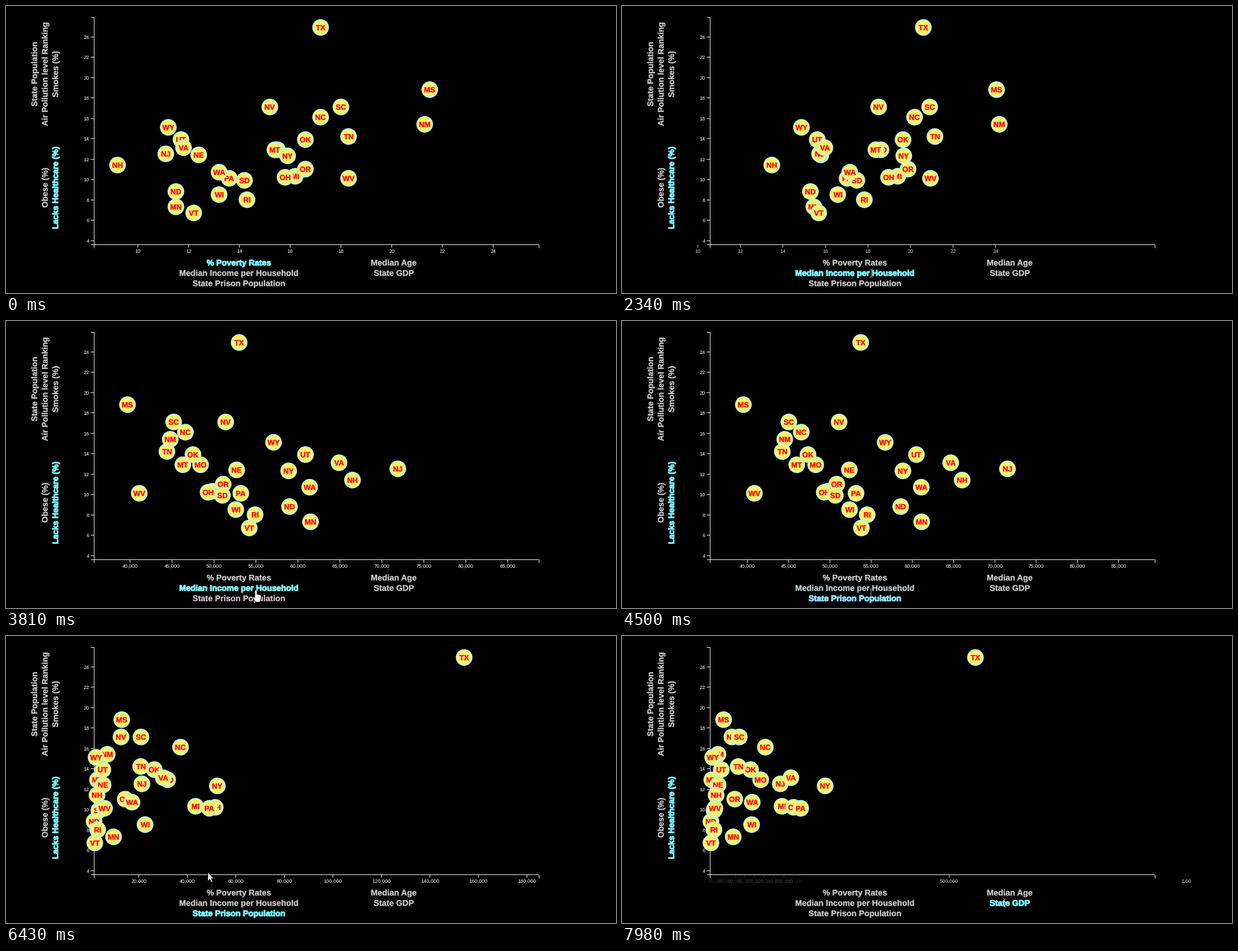
Write a matplotlib script that moves like this. It is 1090 px wide and 514 px high and loops after 8 s.

```python
import numpy as np
import matplotlib.pyplot as plt
from matplotlib.animation import FuncAnimation
from matplotlib.collections import LineCollection, PathCollection
from matplotlib.colors import to_rgb
from matplotlib.patches import Circle, PathPatch, Polygon, Rectangle
from matplotlib.path import Path
from matplotlib.textpath import TextPath
from matplotlib.transforms import Affine2D, IdentityTransform

W, H, DPI = 1090, 514, 100
PX = 72 / DPI
LOOP, STEP = 8000, 20
REFRESH, PHASE = 77.3, 15      # the picture changes on this beat (ms)
MOVE, FADE = 1000, 300         # length of axis moves and colour fades (ms)
STARTS = [1990, 4315, 7307]    # when each axis move begins
LEFT, RIGHT, TOP, BOTTOM = 157.5, 952.5, 20.5, 427.5
BOLD = dict(family="Liberation Sans", weight="bold")
GREY, CYAN, PINK = (np.array(to_rgb(c)) for c in ("#c8c8c8", "#7df0ff", "#ff6fe0"))

# state: poverty %, lacks healthcare %, income and prisoners in thousands
DATA = dict(
    MI=(16.2, 10.3, 49.8, 43.4), MN=(11.5, 7.3, 61.5, 9.6), MS=(21.5, 18.8, 39.7, 13.0),
    MO=(15.5, 12.9, 48.4, 31.9), MT=(15.4, 12.9, 46.3, 3.0), NE=(12.4, 12.4, 52.7, 5.3),
    NV=(15.2, 17.1, 51.4, 12.7), NH=(9.2, 11.4, 66.5, 2.8), NJ=(11.1, 12.5, 71.9, 21.3),
    NM=(21.3, 15.4, 44.8, 7.0), NY=(15.9, 12.3, 58.9, 52.4), NC=(17.2, 16.1, 46.6, 37.2),
    ND=(11.5, 8.8, 59.0, 1.6), OH=(15.8, 10.2, 49.3, 51.5), OK=(16.6, 13.9, 47.5, 26.4),
    OR=(16.6, 11.0, 51.1, 14.4), PA=(13.6, 10.1, 53.2, 49.1), RI=(14.3, 8.0, 54.9, 3.1),
    SC=(18.0, 17.1, 45.2, 20.9), SD=(14.2, 9.9, 51.0, 3.6), TN=(18.3, 14.2, 44.4, 20.8),
    TX=(17.2, 24.9, 53.0, 154.1), UT=(11.7, 13.9, 60.9, 5.2), VT=(12.2, 6.7, 54.2, 1.9),
    VA=(11.8, 13.1, 64.9, 30.1), WA=(13.2, 10.7, 61.4, 17.2), WV=(18.3, 10.1, 41.1, 5.9),
    WI=(13.2, 8.5, 52.6, 22.6), WY=(11.2, 15.1, 57.1, 2.4))
poverty, health, income, prison = np.array(list(DATA.values())).T
# output grows with the size of a state and the square of its income
gdp = 15 * prison ** 0.9 * (income / 50) ** 2

# values, pixel of zero, pixels per unit, ticks
SCALES = [(poverty, -218.0, 45.36, range(10, 25, 2)),
          (1e3 * income, -378.4, 0.015, range(40000, 85001, 5000)),
          (1e3 * prison, 150.5, 0.004336, range(20000, 180001, 20000)),
          (1e3 * gdp, 150.0, 0.0002868, range(500000, 2500001, 500000))]


def lerp(a, b, k):
    return a + (b - a) * k


def ease(k):
    k = min(max(k, 0), 1)
    return 4 * k ** 3 if k < 0.5 else 1 - 4 * (1 - k) ** 3


def scale_y(v):
    return 420.1 - 18.25 * (v - 4)


fig = plt.figure(figsize=(W / DPI, H / DPI), dpi=DPI, facecolor="black")
ax = fig.add_axes([0, 0, 1, 1])
ax.set_xlim(0, W)
ax.set_ylim(H, 0)
ax.axis("off")
view = Rectangle((43, 0), 974, H, visible=False)
ax.add_patch(view)


# ---- axes ----
def line(xs, ys):
    ax.plot(xs, ys, color="white", lw=PX, snap=False)


def tick_text(x, y, s, ha):
    return ax.text(x, y, s, ha=ha, va="baseline", color="white", clip_on=True,
                   family="Liberation Sans", fontsize=9.2 * PX)


line([LEFT - 5.5, LEFT, LEFT, LEFT - 5.5], [TOP, TOP, BOTTOM, BOTTOM])
line([LEFT, LEFT, RIGHT, RIGHT], [BOTTOM + 5.5, BOTTOM, BOTTOM, BOTTOM + 5.5])
for v in range(4, 25, 2):
    y = np.floor(scale_y(v)) + 0.5
    line([LEFT - 5.5, LEFT], [y, y])
    tick_text(LEFT - 9, y + 3.3, str(v), "right")

tick_labels = {}
for v in sorted({v for s in SCALES for v in s[3]}):
    tick_labels[v] = tick_text(0, 442, f"{v:,}", "center")
    tick_labels[v].set_clip_path(view)
tick_lines = LineCollection([], linewidths=PX, snap=False)
ax.add_collection(tick_lines, autolim=False)
tick_lines.set_clip_path(view)


# ---- state dots: disc and text in turn, so later states cover earlier ones ----
def centred(s, size, drop):
    path = TextPath((0, 0), s, size=size, prop=BOLD)
    box = path.get_extents()
    return Affine2D().translate(-(box.x0 + box.x1) / 2, -drop).transform_path(path)


count = len(DATA)
disc = Affine2D().scale(14).transform_path(Path.unit_circle())
dots = PathCollection([p for s in DATA for p in (disc, centred(s, 13.4, 4.9))],
                      offsets=np.zeros((2 * count, 2)),
                      offset_transform=ax.transData, transform=IdentityTransform(),
                      facecolors=["#fff06a", "#ff0a0a"] * count,
                      edgecolors=["#a6f7f2", "#ff0a0a"] * count,
                      linewidths=[1.8 * PX, 0.5 * PX] * count, zorder=3)
ax.add_collection(dots, autolim=False)


# ---- captions ----
def paint(patch, color, strong):
    patch.set_facecolor(color)
    patch.set_edgecolor(color)
    patch.set_linewidth((1.2 if strong else 0.4) * PX)


def caption(s, cx, cy, color=GREY, turn=0):
    tr = Affine2D().scale(1, -1).rotate_deg(turn).translate(cx, cy)
    patch = PathPatch(tr.transform_path(centred(s, 14.7, 5.2)), zorder=4)
    ax.add_patch(patch)
    paint(patch, color, color is CYAN)
    return patch


for i, s in enumerate(["State Population", "Air Pollution level Ranking", "Smokes (%)"]):
    caption(s, 50.5 + 18.7 * i, 122.3, turn=-90)
caption("Obese (%)", 69.2, 325.5, turn=-90)
caption("Lacks Healthcare (%)", 87.9, 325.5, CYAN, -90)
caption("Median Age", 693, 459.5)

# Captions that react to the pointer, with their colour changes over time
REACTIVE = [
    (caption("% Poverty Rates", 416, 459.5),
     [(0, CYAN), (2000, GREY), (5720, PINK), (5790, GREY)]),
    (caption("Median Income per Household", 416, 478),
     [(0, GREY), (500, PINK), (2000, CYAN), (4250, GREY), (5580, PINK), (5710, GREY)]),
    (caption("State Prison Population", 416, 496.5),
     [(0, GREY), (330, PINK), (490, GREY), (3760, PINK), (4250, CYAN), (7320, GREY)]),
    (caption("State GDP", 693, 478),
     [(0, GREY), (6830, PINK), (7320, CYAN)]),
]


def caption_color(events, t):
    color = now = events[0][1]
    for start, new in events[1:]:
        if t >= start:
            color, now = lerp(color, new, min((t - start) / FADE, 1)), new
    return color, now is CYAN


# ---- pointer: time, x, y ----
PATH = np.array([(130, 471.5, 512.5), (600, 445, 478), (3740, 446, 479), (3960, 445, 487),
                 (5520, 445, 487), (6050, 242, 381), (6230, 242, 381), (6430, 360, 423),
                 (6850, 683.5, 478)])
KINDS = [(130, "arrow"), (330, "hand"), (2000, "beam"), (3760, "hand"), (4250, "beam"),
         (5580, "hand"), (5790, "arrow"), (6830, "hand"), (7320, "beam")]
CLICKS = [1860, 4110, 7180]
HOLD = 140

SHAPES = {
    "arrow": [(0, 0), (0, 16), (3.7, 12.6), (6.2, 18.4), (8.6, 17.4), (6.2, 11.6), (11, 11.4)],
    "hand": [(-1, 2), (0.5, 0.5), (2.5, 1.5), (3, 8), (9, 9.5), (10.3, 11.5),
             (10, 17), (8, 22), (0, 22), (-4.5, 15), (-4, 12.5), (-1, 14)],
    "beam": [(x * sx, y * sy) for sx, sy in ((1, -1), (1, 1), (-1, 1), (-1, -1))
             for x, y in ((0.5, 6.2), (3, 7.2), (3, 8), (0.5, 7.2))[::sx * sy]],
}
ring = Circle((0, 0), 11, facecolor="#f0d800", alpha=0.58, lw=0, zorder=6)
pointer = Polygon([(0, 0), (1, 1), (1, 0)], edgecolor="black", zorder=7)
ax.add_patch(ring)
ax.add_patch(pointer)


def draw_pointer(t):
    spot = np.array([np.interp(t, PATH[:, 0], PATH[:, i]) for i in (1, 2)])
    kind = next((k for start, k in reversed(KINDS) if t >= start), None)
    pointer.set_visible(kind is not None)
    if kind:
        beam = kind == "beam"
        pointer.set_xy(spot + np.array(SHAPES[kind]))
        pointer.set_facecolor("#b4b4b4" if beam else "white")
        pointer.set_linewidth(0 if beam else 0.9 * PX)
    ring.center = tuple(spot)
    ring.set_visible(any(0 <= t - c < HOLD for c in CLICKS))


def draw_scale(t):
    n = max(sum(t >= s for s in STARTS) - 1, 0)
    p = ease((t - STARTS[n]) / MOVE)
    (va, a0, ak, ta), (vb, b0, bk, tb) = SCALES[n:n + 2]
    xs = lerp(a0 + ak * va, b0 + bk * vb, p)
    dots.set_offsets(np.repeat(np.column_stack([xs, scale_y(health) - 0.2]), 2, axis=0))

    segs, colors = [], []
    for v, label in tick_labels.items():
        x = lerp(a0 + ak * v, b0 + bk * v, p)
        alpha = lerp(float(v in ta), float(v in tb), p)
        shown = alpha > 0.01 and 10 < x < W
        label.set_visible(shown)
        if shown:
            label.set_x(x)
            label.set_alpha(alpha)
            segs.append([(x, BOTTOM), (x, BOTTOM + 5.5)])
            colors.append((1, 1, 1, alpha))
    tick_lines.set_segments(segs)
    tick_lines.set_color(colors)


def draw(i):
    now = (i + 1) * STEP
    t = PHASE + REFRESH * ((now - PHASE) // REFRESH)
    draw_scale(t)
    for patch, events in REACTIVE:
        paint(patch, *caption_color(events, t))
    draw_pointer(t)
    return []


anim = FuncAnimation(fig, draw, frames=LOOP // STEP, interval=STEP, repeat=True,
                     repeat_delay=0, cache_frame_data=False)
plt.show()
```
